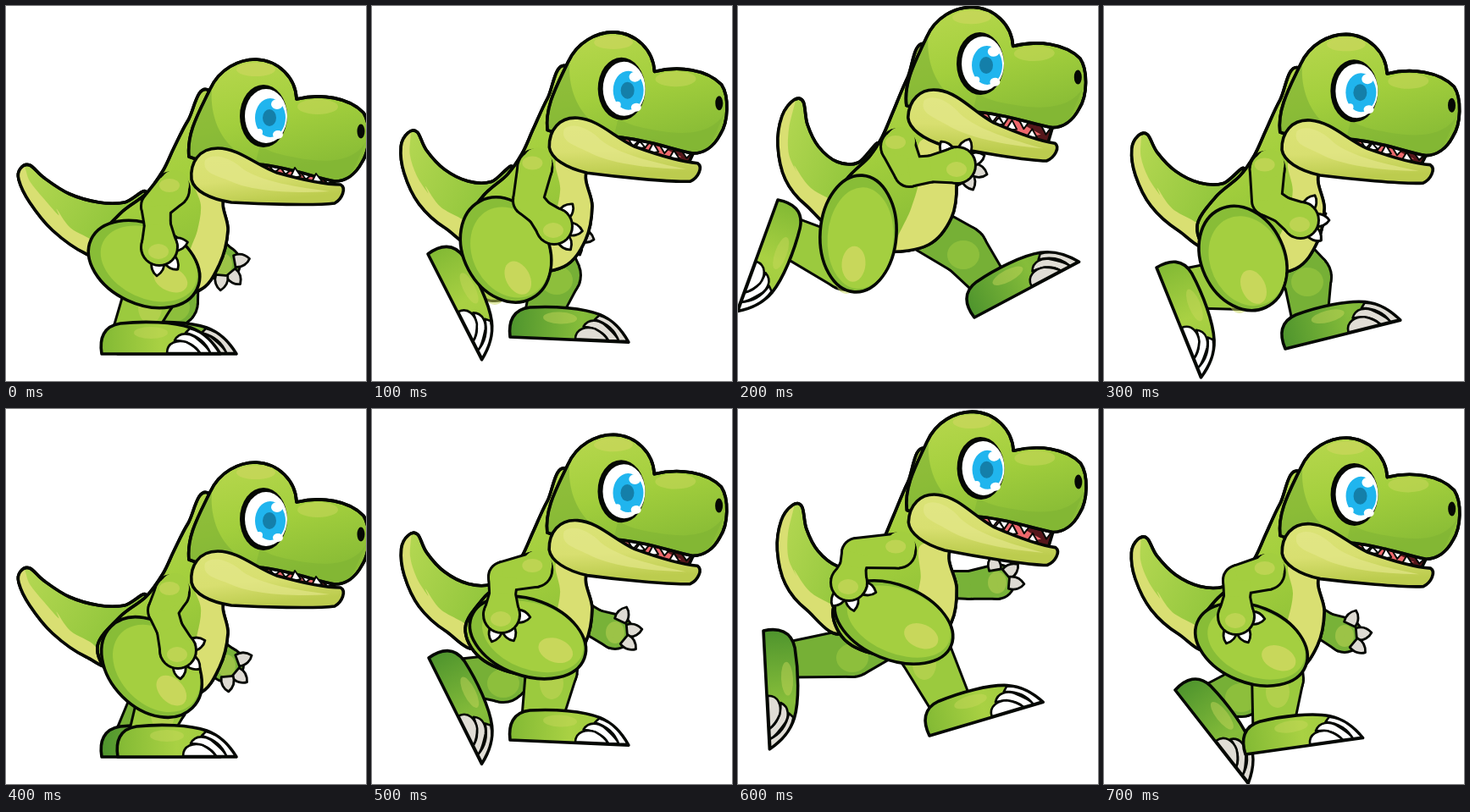
An HTML page for the animation above (0.8 s loop, 425 by 443 pixels).

```html
<!DOCTYPE html>
<html lang="en">
<head>
<meta charset="utf-8">
<title>Running dinosaur</title>
<style>
html, body { margin: 0; width: 100%; height: 100%; overflow: hidden; background: #fff; }
svg { display: block; width: 100%; height: 100%; }
</style>
</head>
<body>
<svg viewBox="0 0 425 443" stroke-linejoin="round" stroke-linecap="round">
  <defs>
    <linearGradient id="skin" x1="0" y1="0" x2=".35" y2="1">
      <stop offset="0" stop-color="#b9d84f"/><stop offset=".55" stop-color="#a3cf3d"/><stop offset="1" stop-color="#8abd36"/>
    </linearGradient>
    <linearGradient id="tailSkin" x1="0" y1="0" x2="1" y2=".5">
      <stop offset="0" stop-color="#b7d954"/><stop offset="1" stop-color="#8cc338"/>
    </linearGradient>
    <linearGradient id="nearFoot" x1="0" y1="0" x2="1" y2="0">
      <stop offset="0" stop-color="#82b934"/><stop offset=".5" stop-color="#a9d143"/><stop offset="1" stop-color="#9bc83c"/>
    </linearGradient>
    <linearGradient id="farFoot" x1="0" y1="0" x2="1" y2="0">
      <stop offset="0" stop-color="#4e942d"/><stop offset=".6" stop-color="#86bd3a"/><stop offset="1" stop-color="#6fa935"/>
    </linearGradient>
    <linearGradient id="jawSkin" x1="0" y1="0" x2=".3" y2="1">
      <stop offset="0" stop-color="#dbe477"/><stop offset=".6" stop-color="#d8df70"/><stop offset="1" stop-color="#bccc4e"/>
    </linearGradient>
  </defs>
  <g id="scene"></g>
</svg>
<script>
const INK = '#050804', GREEN = '#a3ce3f', SHADE = '#78ad34', PALE = '#d9df72', GLOW = '#c8d75b';
const STEP = 100;
const LINE = `stroke="${INK}" stroke-width="3.6"`;

// Height of the bounce: 0 is lowest, 1 is highest
const bounce = [0, .52, 1, .48, 0, .53, .97, .47];

// Thigh: cx, cy, rx, ry, tilt
const thighs = [
  [163, 305, 69, 47, 25], [158, 288, 65, 50, 62], [142, 269, 69, 45, 94], [164, 298, 64, 49, 65],
  [172, 305, 68, 49, 45], [184, 270, 71, 45, 20], [184, 252, 73, 44, 22], [174, 278, 69, 45, 22]
];
// Foot: heel x, heel y, turn; then knee x, y
const nearLegs = [
  [113, 411, 0, 170, 340], [66, 293, 63, 145, 318], [47, 229, 110, 128, 305], [62, 309, 68, 160, 328],
  [132, 411, 0, 185, 345], [163, 391, 2.5, 212, 308], [226, 386, -16.5, 220, 285], [167, 408, -8, 205, 318]
];
const farLegs = [
  [132, 411, 0, 198, 350], [163, 391, 2.5, 218, 318], [279, 368, -28, 266, 288], [214, 405, -14, 240, 320],
  [113, 411, 0, 175, 345], [67, 294, 63.5, 155, 318], [30, 262, 87, 135, 288], [84, 332, 52, 162, 335]
];
// Elbow x, y; hand x, y; turn of the first claw
const nearArms = [
  [177, 236, 181, 285, -10], [184, 230, 215, 260, -50], [202, 196, 259, 188, -125], [192, 230, 232, 253, -60],
  [185, 238, 203, 285, -20], [155, 198, 153, 243, 5], [140, 170, 131, 205, 20], [158, 202, 156, 245, 5]
];
// Hand x, y; turn of the first claw
const farArms = [
  [256, 304, -10], [232, 265, -40], [264, 188, -40], [232, 256, -20],
  [260, 302, -20], [287, 263, -65], [306, 204, -100], [284, 267, -65]
];

const tailLow = [165,222, 140,232, 110,232, 75,222, 45,203, 28,188, 17,192, 15,205, 28,232, 55,265, 95,293, 130,300];
const tailHigh = [165,165, 142,185, 117,184, 95,166, 82,140, 77,113, 66,111, 52,130, 47,165, 56,205, 80,235, 125,262];
const underLow = [19,186, 28,207, 45,228, 62,247, 60,240, 76,262, 105,280, 110,305, 40,270, 5,210];
const underHigh = [68,104, 60,145, 60,175, 70,197, 67,189, 86,215, 125,240, 120,270, 60,240, 35,160];
const torsoLow = [240,100, 215,135, 198,168, 185,195, 165,222, 135,245, 108,280, 125,315, 175,340, 228,336, 252,305, 262,265, 258,225, 300,190];
const torsoHigh = [222,45, 200,85, 183,125, 170,155, 155,178, 128,205, 112,240, 130,275, 175,290, 225,282, 252,250, 258,210, 250,165, 290,120];
const bellyLow = [222,205, 230,235, 226,265, 215,300, 222,345, 262,310, 270,265, 262,220];
const bellyHigh = [215,160, 215,200, 204,240, 182,295, 225,295, 265,255, 268,210, 255,160];

const mix = (a, b, k) => a + (b - a) * k;
const blend = (a, b, k) => a.map((v, i) => mix(v, b[i], k));
const round = v => Math.round(v * 10) / 10;

// Closed Catmull-Rom curve through flat x, y pairs
function smooth(p) {
  const n = p.length / 2;
  const at = i => { const j = (i + n) % n; return [p[2 * j], p[2 * j + 1]]; };
  let d = `M${at(0).map(round)}`;
  for (let i = 0; i < n; i++) {
    const a = at(i - 1), b = at(i), c = at(i + 1), e = at(i + 2);
    d += `C${[0, 1].map(m => round(b[m] + (c[m] - a[m]) / 6))} ${[0, 1].map(m => round(c[m] - (e[m] - b[m]) / 6))} ${c.map(round)}`;
  }
  return d + 'Z';
}

const path = (d, fill, extra = LINE) => `<path d="${d}" fill="${fill}" ${extra}/>`;
const oval = (x, y, rx, ry, fill, extra = '') => `<ellipse cx="${x}" cy="${y}" rx="${rx}" ry="${ry}" fill="${fill}" ${extra}/>`;
const place = (x, y, turn, body) => `<g transform="translate(${x} ${y}) rotate(${turn})">${body}</g>`;
const clip = (id, d, body) => `<clipPath id="${id}"><path d="${d}"/></clipPath><g clip-path="url(#${id})">${body}</g>`;

// Tapered limb through circles [x, y, r], outlined as one shape
function limb(joints, fill) {
  let body = '';
  joints.forEach(([x, y, r], i) => {
    body += `<circle cx="${x}" cy="${y}" r="${r}"/>`;
    if (!i) return;
    const [u, v, q] = joints[i - 1], len = Math.hypot(x - u, y - v) || 1;
    const nx = (v - y) / len, ny = (x - u) / len;
    body += `<path d="M${u + nx * q} ${v + ny * q}L${x + nx * r} ${y + ny * r}L${x - nx * r} ${y - ny * r}L${u - nx * q} ${v - ny * q}Z"/>`;
  });
  return `<g fill="${INK}" stroke="${INK}" stroke-width="6">${body}</g><g fill="${fill}">${body}</g>`;
}

function claws(x, y, reach, turn, fill) {
  return [0, 60, 105].map(a => place(x, y, turn + a,
    path(`M${reach - 5} -7C${reach + 4} -9 ${reach + 10} -4 ${reach + 13} 0C${reach + 10} 5 ${reach + 3} 9 ${reach - 5} 7Z`, fill, `stroke="${INK}" stroke-width="2.8"`))).join('');
}

function foot([x, y, turn], fill, nail) {
  const thin = `stroke="${INK}" stroke-width="2.6"`;
  return place(x, y, turn,
    path('M0 0C-3 -18 2 -33 22 -36C50 -39 85 -38 105 -31C124 -24 134 -10 140 0Z', fill) +
    oval(58, -25, 20, 7, GLOW, 'opacity=".45"') +
    path('M104 -30C122 -26 133 -10 139 -1L128 -1C124 -12 114 -21 99 -25Z', nail, thin) +
    path('M86 -16C92 -27 104 -24 110 -20C120 -12 127 -5 128 -1L116 -1C112 -8 104 -15 86 -16Z', nail, thin) +
    path('M77 -1C77 -14 90 -17 100 -14C110 -9 114 -4 116 -1Z', nail, thin));
}

function ankle([x, y, turn], r) {
  const a = turn * Math.PI / 180, c = Math.cos(a), s = Math.sin(a);
  return [x + 36 * c + 24 * s, y + 36 * s - 24 * c, r];
}

function farSide(i, k) {
  const [x, y, turn] = farArms[i], leg = farLegs[i];
  return limb([[235, mix(270, 205, k), 14], [mix(235, x, .55), mix(mix(270, 212, k), y, .6), 15], [x, y, 19]], '#78b238') +
    oval(x, y + 1, 11, 13, GLOW, 'opacity=".45"') + claws(x, y, 19, turn, '#dedbd3') +
    limb([[200, mix(300, 250, k), 26], [leg[3], leg[4], 27], ankle(leg, 19)], '#76b036') +
    oval(leg[3], leg[4] + 6, 19, 17, '#a0cc42', 'opacity=".55"') +
    foot(leg, 'url(#farFoot)', '#e0ddd5');
}

function trunk(k) {
  const tail = smooth(blend(tailLow, tailHigh, k)), torso = smooth(blend(torsoLow, torsoHigh, k));
  return path(tail, 'url(#tailSkin)') +
    clip('tailClip', tail, path(smooth(blend(underLow, underHigh, k)), PALE, '')) +
    path(tail, 'none') +
    path(torso, 'url(#skin)') +
    clip('torsoClip', torso, path(smooth(blend(bellyLow, bellyHigh, k)), PALE, '')) +
    path(torso, 'none');
}

function nearLeg(i) {
  const leg = nearLegs[i], [x, y, rx, ry, tilt] = thighs[i];
  return limb([[leg[3], leg[4], 29], ankle(leg, 22)], '#9bca3e') +
    oval(leg[3], leg[4] + 16, 14, 19, GLOW, 'opacity=".5"') +
    foot(leg, 'url(#nearFoot)', '#fff') +
    place(x, y, tilt,
      oval(0, 0, rx, ry, '#88bd37', LINE) + oval(5, -3, rx - 9, ry - 6, '#a4cf40') +
      oval(36, 3, 21, 14, GLOW));
}

function head(k) {
  const skull = 'M216 178C213 150 228 125 241 98C252 74 275 63 295 63C322 64 342 85 343 110C372 103 405 108 422 126C431 140 430 170 420 185C412 200 400 207 388 207C365 203 335 190 298 187L250 190Z';
  const tooth = (x, y, h) => path(`M${x - 6} ${y - h * .2}L${x} ${y + h}L${x + 7} ${y + h * .1}Z`, '#fff', `stroke="${INK}" stroke-width="2"`);
  const mouth = path(`M298 187L340 191L388 207L382 ${212 + 14 * k}L320 ${198 + 4 * k}Z`, '#55171b') +
    path(`M305 189L342 ${194 + k * 2}L374 ${207 + 8 * k}L360 ${208 + 10 * k}L325 ${198 + 4 * k}Z`, '#ee686c', '');
  const upper = tooth(317, 190, 7 + 3 * k) + tooth(330, 192, 7 + 4 * k) + tooth(354, 198, 7 + 3 * k) + tooth(380, 205, 5 + 5 * k);
  const jaw = `<g transform="rotate(${9 * k} 300 190)">` +
    tooth(341, 202, -11) + tooth(366, 208, -10) + (k > .2 ? tooth(325, 198, -8) : '') +
    path('M219 205C217 185 228 168 250 168C275 168 295 188 320 197C345 204 375 211 395 211C402 215 397 228 388 233C365 236 300 234 266 232C240 228 222 218 219 205Z', 'url(#jawSkin)') +
    path('M235 182C245 172 266 180 279 192C302 208 345 214 382 219C335 222 288 218 265 207C249 200 231 198 235 182Z', '#e5e98c', 'opacity=".65"') + '</g>';
  const eye = oval(304, 130, 28, 37, INK) + oval(307, 130, 25, 32, '#fff') +
    oval(312, 132, 18, 23, '#20b5ee') + oval(311, 132, 8, 10, '#147fa9') +
    oval(320, 116, 7, 6, '#fff') + oval(321, 152, 6, 5, '#fff') + oval(299, 149, 4, 4, '#fff');
  return `<g transform="translate(${-18 * k} ${-62 * k}) rotate(${-k} 309 130)">` + mouth + upper +
    path(skull, 'url(#skin)') +
    clip('skullClip', skull,
      path('M208 185C213 145 230 110 244 90C239 120 248 150 268 168L250 195Z', SHADE, 'opacity=".55"') +
      path('M430 150C418 182 388 188 342 179C325 176 308 172 300 164L292 195L400 215Z', SHADE, 'opacity=".4"') +
      oval(295, 75, 23, 8, GLOW, 'opacity=".8"') + oval(368, 119, 24, 9, GLOW, 'opacity=".55"')) +
    path(skull, 'none') + eye + oval(419, 148, 4.5, 8.5, INK) + jaw + '</g>';
}

function nearArm(i, k) {
  const [ex, ey, hx, hy, turn] = nearArms[i];
  const sx = mix(196, 189, k), sy = mix(217, 166, k);
  return claws(hx, hy, 21, turn, '#fff') +
    limb([[sx, sy, 19], [ex, ey, 16], [mix(ex, hx, .45), mix(ey, hy, .45), 14], [hx, hy, 20]], GREEN) +
    `<circle cx="${sx + 3}" cy="${sy - 6}" r="17" fill="${GREEN}"/>` +
    oval(sx - 3, sy - 5, 12, 8, GLOW, 'opacity=".7"') +
    oval(hx - 1, hy + 5, 12, 9, GLOW, 'opacity=".7"');
}

const scene = document.getElementById('scene');
let shown = -1;

function render(time) {
  const i = Math.floor(time / STEP) % bounce.length;
  if (i !== shown) {
    const k = bounce[i];
    scene.innerHTML = farSide(i, k) + trunk(k) + nearLeg(i) + head(k) + nearArm(i, k);
    shown = i;
  }
}

const start = performance.now();
function tick() {
  render(Math.max(0, performance.now() - start));
  requestAnimationFrame(tick);
}
tick();
</script>
</body>
</html>
```
